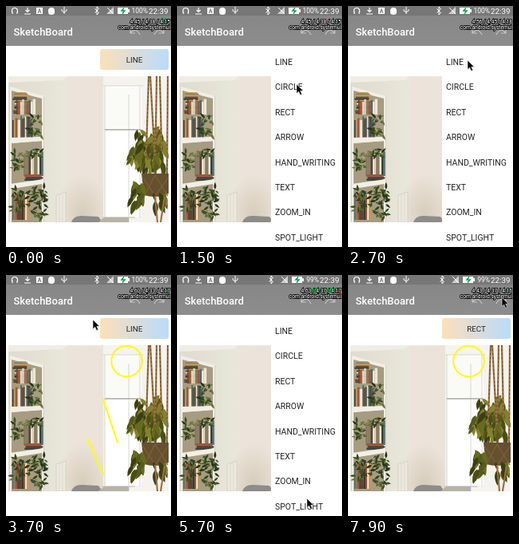
Recreate the animation shown at these times as an HTML page. Size 207 by 302 pixels, loop 8 s.

```html
<!DOCTYPE html>
<html lang="en">
<head>
<meta charset="utf-8">
<title>Sketch demo</title>
<style>
html, body { margin: 0; width: 100%; height: 100%; overflow: hidden; background: #fff; }
svg { display: block; width: 100vw; height: 100vh; font-family: Roboto, sans-serif; }
.icons { fill: none; stroke: #fff; stroke-width: 1.2; }
.solid { fill: #fff; stroke: none; }
.label { font-size: 10.5px; fill: #222; }
.load { font-size: 6.6px; fill: #fff; stroke: #111; stroke-width: 1.8px; paint-order: stroke; text-anchor: end; }
.ink { fill: none; stroke: #ff0; stroke-width: 2; stroke-linecap: round; }
.ropes { fill: none; stroke: #9b7142; stroke-width: 2.2; }
</style>
</head>
<body>
<svg viewBox="0 0 207 302" xmlns="http://www.w3.org/2000/svg">
  <defs>
    <linearGradient id="button">
      <stop stop-color="#fbe1b8"/><stop offset=".5" stop-color="#dcdcda"/><stop offset="1" stop-color="#b9dcfb"/>
    </linearGradient>
    <linearGradient id="wall">
      <stop stop-color="#dfdbce"/><stop offset=".35" stop-color="#e9e6da"/>
      <stop offset=".38" stop-color="#ece4da"/><stop offset=".62" stop-color="#ebe3d9"/>
    </linearGradient>
    <radialGradient id="shade">
      <stop stop-color="#c9bda6" stop-opacity=".6"/><stop offset="1" stop-color="#c9bda6" stop-opacity="0"/>
    </radialGradient>
    <linearGradient id="bar" x2="0" y2="1">
      <stop stop-color="#858585"/><stop offset="1" stop-color="#8d8d8d"/>
    </linearGradient>
    <clipPath id="photoClip"><path d="M3 88H204V271H3z"/></clipPath>
  </defs>
  <rect width="207" height="302" fill="#fff"/>

  <g clip-path="url(#photoClip)">
    <rect x="3" y="88" width="201" height="183" fill="url(#wall)"/>
    <ellipse cx="96" cy="262" rx="34" ry="52" fill="url(#shade)"/>
    <path d="M3 88H78L70 93 3 96z" fill="#efede4"/>
    <path d="M5 101L48 113V271H5z" fill="#f1eee5"/>
    <path d="M7 106L45 116V164L7 167zM7 172L45 169V218L7 224zM7 229L45 223V271H7z" fill="#a69c82"/>
    <path d="M47.500 113V271" stroke="#d5d0c3"/>
    <g id="books"/>
    <path d="M63 237L75 233V271H63z" fill="#ece8de" stroke="#cfcabf" stroke-width=".7"/>
    <path d="M67 236V271M71 235V271" stroke="#d8d3c8" stroke-width=".7"/>
    <path d="M122 88H204V271H122z" fill="#f5f3ee"/>
    <path d="M124 100H170V264H124z" fill="#fff"/>
    <path d="M125 102H168V153H125z" fill="#fafaf7"/>
    <path d="M122 100H172M124 100V265M154 111V271M168 101V265" fill="none" stroke="#cfccc4" stroke-width=".8"/>
    <path d="M124 155H169" stroke="#aaa99f" stroke-width="1.500"/>
    <path d="M120 265H162" stroke="#d8d5cc" stroke-width="2"/>
    <path d="M82 271Q85 262 96 263L116 264 121 271z" fill="#8e8c89"/>
    <path d="M116 271L123 265H154V271z" fill="#b8b2a8"/>
    <g id="plant"/>
    <g class="ropes">
      <path d="M179 88L175 212M181 88L188 215M189 88L187 215M193 88L196 215M203 88L202 216"/>
      <path d="M179 88L175 212M181 88L188 215M189 88L187 215M193 88L196 215M203 88L202 216" stroke="#6a4524" stroke-width="1" stroke-dasharray="2 3"/>
    </g>
    <g id="front"/>
    <path d="M170 210H204V235Q190 242 173 237z" fill="#65502f"/>
    <path d="M172 215L187 238 204 214M174 237L187 212 203 238" fill="none" stroke="#7d6138" stroke-width="1.200"/>
    <g id="vines"/>
    <path class="ropes" d="M187 238L190 271M199 239L194 271"/>
  </g>

  <g class="ink">
    <circle id="circle" cx="151.500" cy="108"/>
    <path id="lineA"/><path id="lineB"/><path id="box"/>
  </g>

  <rect x="118" y="54" width="86" height="26" rx="3" fill="url(#button)"/>
  <text id="tool" x="161" y="71" font-size="9.800" fill="#222" text-anchor="middle"></text>
  <g id="menu"><rect x="118" y="50" width="89" height="252" fill="#fff"/></g>

  <rect width="207" height="50" fill="url(#bar)"/>
  <rect width="207" height="12" fill="#777"/>
  <text x="9.500" y="37" font-size="13" font-weight="500" fill="#fff">SketchBoard</text>
  <g class="icons" stroke-opacity=".5">
    <path d="M156 28V34H162M156 34Q163 26 168 36"/>
    <path d="M198 28V34H192M198 34Q191 26 186 36"/>
  </g>
  <g class="icons">
    <path d="M7.500 8V6A3.500 3.500 0 0 1 14.500 6V8M8 7V10M14 7V10"/>
    <path d="M23 10H31M27 2V7M24.500 5L27 7.500 29.500 5"/>
    <path class="solid" d="M38 2H46V10H38z"/><path d="M40 9L42 3.500 44 9M41 7H43" stroke="#777" stroke-width="1"/>
    <path class="solid" d="M53 6A4 4 0 0 1 61 6V8A4 3 0 0 1 53 8z"/>
    <path d="M73 1V10M70 4V6L73 8 76 6V4" stroke-width="1"/>
  </g>
  <g id="signals" class="icons">
    <path d="M111.500 3.500L116.500 8.500 114 11V1L116.500 3.500 111.500 8.500" stroke-width="1"/>
    <path class="solid" d="M126 10L135 1V10z" opacity=".65"/><path d="M127 2L135 10" stroke-width="1"/>
    <path class="solid" d="M140 2H153V4H155V8H153V10H140z"/>
    <path d="M148 2.500L145 6H149L146 9.500" stroke="#0a9b55" stroke-width="1.500"/>
  </g>
  <text id="battery" x="178" y="9.300" font-size="8.500" fill="#fff" text-anchor="end"></text>
  <text x="203.500" y="9.500" font-size="9.800" fill="#fff" text-anchor="end">22:39</text>
  <rect id="loadBar" y="16" height="6" fill="#20bd45"/>
  <rect id="loadEnd" y="16" height="6" fill="#c93c35"/>
  <text id="loadText" class="load" x="206" y="21.500"></text>
  <text class="load" x="206" y="29">com.android.systemui</text>
  <path id="cursor" d="M0 0V11.500L2.700 9.200 4.700 13.500 6.700 12.500 4.800 8.300H8.300z" fill="#080808" stroke="#eee" stroke-width=".6"/>
</svg>
<script>
const $ = id => document.getElementById(id);
const add = (parent, tag, attrs, text = '') => {
  const node = document.createElementNS('http://www.w3.org/2000/svg', tag);
  for (const key in attrs) node.setAttribute(key, attrs[key]);
  node.textContent = text;
  $(parent).append(node);
};
let seed = 17;
const random = () => (seed = seed * 16807 % 2147483647) / 2147483647;
const between = (low, high) => low + random() * (high - low);
const pick = list => list[Math.floor(random() * list.length)];

const covers = ['#5a4636', '#343c38', '#a3563a', '#e0d5bb', '#877b62', '#4d6a66', '#c09a5c', '#eee6d2'];
function uprightBooks(left, right, base, height) {
  for (let x = left; x < right;) {
    const width = between(1.5, 3.5), tall = height * between(.8, 1);
    add('books', 'rect', { x, y: base - tall, width, height: tall, fill: pick(covers) });
    x += width;
  }
}
function stackedBooks(left, right, top, base) {
  for (let y = top; y < base;) {
    const height = between(1.5, 3.5);
    add('books', 'rect', { x: left + between(0, 3), y, width: right - left - between(0, 4), height, fill: pick(covers) });
    y += height;
  }
}
function leaf(parent, x, y, length, angle, fill) {
  add(parent, 'path', {
    d: `M0 0Q${length * .35} ${length * .35} 0 ${length}Q${-length * .35} ${length * .35} 0 0`,
    transform: `translate(${x} ${y}) rotate(${angle})`, fill
  });
}
const greens = ['#27351a', '#3d4f22', '#2f4420', '#6b7438'];
function bush(x, y, width, height, count) {
  for (let i = 0; i < count; i++)
    leaf('books', x + between(-.5, .5) * width, y + between(-.5, .5) * height, between(4, 9), between(-180, 180), pick(greens));
}
const olives = ['#4a4d16', '#676a1f', '#83822d', '#565a1a', '#3b3f12'];
function foliage(parent, count, left, right, top, bottom, spread) {
  for (let i = 0; i < count; i++)
    leaf(parent, between(left, right), between(top, bottom), between(11, 20), between(-spread, spread), pick(olives));
}

stackedBooks(8, 28, 108, 134);
uprightBooks(13, 35, 136, 20);
uprightBooks(8, 32, 165, 27);
uprightBooks(22, 45, 213, 34);
stackedBooks(22, 45, 211, 218);
uprightBooks(8, 27, 268, 36);
add('books', 'path', { d: 'M5 165L47 164V169L5 172zM5 223L47 217V222L5 229z', fill: '#f2efe5' });
bush(37, 150, 11, 22, 30);
bush(14, 195, 11, 22, 28);
bush(36, 184, 14, 10, 14);
bush(15, 243, 11, 26, 32);
bush(39, 246, 19, 34, 65);

foliage('plant', 65, 164, 198, 150, 198, 45);
foliage('plant', 12, 157, 168, 172, 196, 40);
foliage('front', 22, 165, 201, 170, 196, 35);
foliage('vines', 24, 158, 172, 218, 246, 30);
foliage('vines', 10, 184, 203, 234, 250, 30);

['LINE', 'CIRCLE', 'RECT', 'ARROW', 'HAND_WRITING', 'TEXT', 'ZOOM_IN', 'SPOT_LIGHT'].forEach((name, i) =>
  add('menu', 'text', { class: 'label', x: 123, y: 74 + i * 31.4 }, name));

// Pointer stops: time, x, y
const stops = [
  [500, 30, 150], [900, 47, 117], [1100, 138, 69], [1300, 150, 70], [1500, 150, 98],
  [1700, 151, 107], [1900, 151, 113], [2300, 151, 127], [2500, 158, 80], [2700, 150, 68],
  [2900, 122, 156], [3100, 140, 210], [3300, 102, 205], [3500, 122, 249], [3700, 109, 56],
  [3900, 160, 32], [4300, 160, 32], [4500, 160, 66], [4700, 163, 80], [4900, 163, 131],
  [5100, 160, 135], [5700, 163, 280], [6300, 156, 142], [6500, 156, 139], [6700, 108, 165],
  [7300, 160, 221], [7500, 160, 100], [7700, 160, 32], [7900, 193, 28]
];
// Load readings: time, averages, green width, red width
const loads = [
  [0, '4.45 / 4.38 / 4.15', 8, 2], [1700, '4.56 / 4.45 / 4.18', 4, 0],
  [2900, '4.60 / 4.33 / 4.17', 4, 0], [4700, '4.93 / 4.42 / 4.18', 54, 22],
  [5700, '4.63 / 4.37 / 4.17', 38, 4], [7100, '4.43 / 4.37 / 4.16', 4, 0]
];
const clamp = n => Math.max(0, Math.min(1, n));
const within = (t, from, to) => t >= from && t < to;
const show = (id, on) => $(id).style.display = on ? '' : 'none';

function pointer(t) {
  const i = Math.max(1, stops.findIndex(stop => stop[0] >= t));
  const [t0, x0, y0] = stops[i - 1], [t1, x1, y1] = stops[i];
  const p = clamp((t - t0) / (t1 - t0));
  return [x0 + (x1 - x0) * p, y0 + (y1 - y0) * p];
}
function stroke(id, t, start, end, gone, x, y, dx, dy) {
  const p = clamp((t - start) / (end - start));
  show(id, within(t, start + 1, gone));
  $(id).setAttribute('d', `M${x} ${y}l${dx * p} ${dy * p}`);
}
function render(t) {
  show('cursor', t >= 500);
  $('cursor').setAttribute('transform', `translate(${pointer(t)})`);
  show('menu', within(t, 1300, 1700) || within(t, 2700, 2900) || within(t, 4700, 6700));
  $('tool').textContent = within(t, 1700, 2900) ? 'CIRCLE' : t < 6700 ? 'LINE' : 'RECT';
  $('battery').textContent = t < 4100 ? '100%' : '99%';
  $('signals').setAttribute('transform', `translate(${t < 4100 ? 0 : 4})`);

  $('circle').setAttribute('r', 19.3 * clamp((t - 1700) / 600));
  show('circle', t > 1700);
  stroke('lineA', t, 2900, 3100, 4300, 122, 156, 18, 54);
  stroke('lineB', t, 3300, 3500, 4100, 102, 205, 20, 44);
  const p = clamp((t - 6700) / 600);
  show('box', within(t, 6701, 7700));
  $('box').setAttribute('d', `M108 165h${52 * p}v${56 * p}h${-52 * p}z`);

  const [, text, green, red] = loads.filter(load => load[0] <= t).pop();
  $('loadText').textContent = text;
  $('loadBar').setAttribute('x', 206 - green);
  $('loadBar').setAttribute('width', green);
  $('loadEnd').setAttribute('x', 206 - red);
  $('loadEnd').setAttribute('width', red);
}
const began = performance.now();
function tick() {
  const t = (performance.now() - began) % 8000;
  render(t < 500 ? 0 : 500 + 200 * Math.floor((t - 500) / 200));
  requestAnimationFrame(tick);
}
tick();
</script>
</body>
</html>
```
